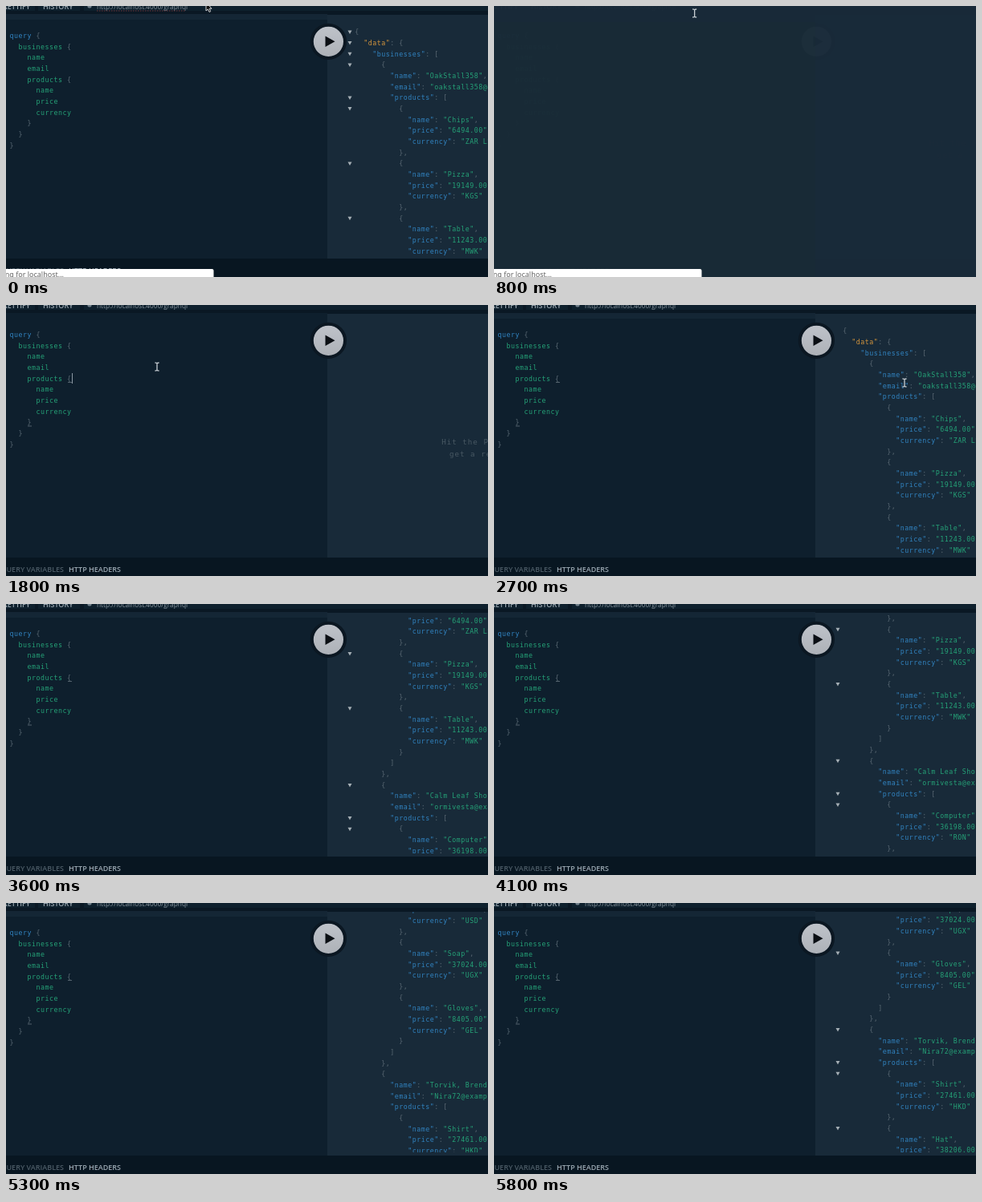
An HTML page that plays this animation: 600x338 px, repeating every 6000 ms.

```html
<!DOCTYPE html>
<html lang="en">
<head>
<meta charset="utf-8">
<title>Query playground</title>
<style>
  html, body { margin: 0; height: 100%; overflow: hidden; background: #192a39; }
  svg { display: block; width: 100vw; height: 100vh; }
  .code { font: 8.3px "DejaVu Sans Mono", monospace; letter-spacing: .503px; fill: #586772; }
  .hint { font-size: 9.2px; letter-spacing: 1px; fill: #485863; }
  .ui { font: 600 9px "Open Sans", sans-serif; fill: #9ca9b3; }
  .url { font-size: 8.3px; font-weight: 400; fill: #84919b; }
  .dim { fill: #4d5c67; }
  .key { fill: #3183c0; }
  .str { fill: #25a177; }
  .root { fill: #d4943c; }
</style>
</head>
<body>
<svg viewBox="0 0 600 338">
  <defs>
    <clipPath id="pane"><rect x="400" y="11" width="200" height="300"/></clipPath>
    <linearGradient id="metal" x2="0" y2="1">
      <stop stop-color="#bfc3ca"/><stop offset="1" stop-color="#adb1b7"/>
    </linearGradient>
  </defs>
  <rect width="600" height="338" fill="#192a39"/>
  <rect y="20" width="400" height="318" fill="#192b37"/>

  <g id="app">
    <rect width="600" height="338" fill="#0a1824"/>
    <rect y="10" width="400" height="305" fill="#0e1f2d"/>
    <rect id="strip" y="10" width="400" height="7" fill="#142635"/>
    <rect x="400" y="11" width="200" height="304" fill="#182a39"/>
    <rect y="315" width="600" height="23" fill="#081621"/>
    <path d="M0 0H36V6H0ZM40 0H92V6H40ZM97 0H600V6H97Z" fill="#0e202d"/>
    <g class="ui">
      <text x="30" y="3.5" text-anchor="end">PRETTIFY</text>
      <text x="46" y="3.5">HISTORY</text>
      <circle cx="104" cy="0" r="2.6" fill="#71808b"/>
      <text x="113" y="3.5" class="url">http://localhost:4000/graphql</text>
      <text x="72" y="333.3" text-anchor="end" class="dim">QUERY VARIABLES</text>
      <text x="78" y="333.3">HTTP HEADERS</text>
    </g>
    <path id="spelling" d="M113 6H223" stroke="#9b3e40" stroke-dasharray="1.5 1.5" opacity=".7"/>
    <g id="query" class="code"></g>
    <path id="braces" d="M77 96.5H82M27 151H32" stroke="#53616c"/>
    <path id="caret" d="M82.5 85V98" stroke="#8b98a3"/>
    <g id="hint" class="code hint" text-anchor="middle">
      <text x="614" y="173.5">Hit the Play Button to</text>
      <text x="614" y="188.5">get a response here</text>
    </g>
    <g clip-path="url(#pane)"><g id="result" class="code"></g></g>
    <circle cx="401.4" cy="44.3" r="20.6" fill="url(#metal)" stroke="#0b1722" stroke-width="4"/>
    <path d="M397.500 37.500L409.500 44.300L397.500 51Z" fill="#0b0f14"/>
  </g>

  <g id="status">
    <path d="M0 328H256.500Q258.500 328 258.500 330V338H0Z" fill="#fff"/>
    <text x="72" y="338" text-anchor="end" font-size="9" font-family="Noto Sans, sans-serif" fill="#666">Waiting for localhost...</text>
  </g>
  <g id="cursor">
    <path id="beam" d="M-2.500 -5Q0 -5 0 -4Q0 -5 2.500 -5M0 -4V4M-2.500 5Q0 5 0 4Q0 5 2.500 5" fill="none" stroke="#c9d0d5" stroke-width="1.3"/>
    <path id="arrow" d="M-1 -7V4L1.300 2L3 5.500L4.700 4.700L3.200 1.300H6Z" fill="#111" stroke="#e4e7ea" stroke-width=".9"/>
  </g>
</svg>
<script>
const $ = id => document.getElementById(id);
const show = (id, on) => $(id).style.display = on ? '' : 'none';
const span = (cls, text) => `<tspan class="${cls}">${text}</tspan>`;
const LINE = 13.667, INDENT = 11;

$('query').innerHTML = [
  [0, 'query {'], [1, 'businesses {'], [2, 'name'], [2, 'email'], [2, 'products {'],
  [3, 'name'], [3, 'price'], [3, 'currency'], [2, '}'], [1, '}'], [0, '}']
].map(([depth, text], i) => {
  const marked = text.replace(/\w+/, w => span(w === 'query' ? 'key' : 'str', w));
  return `<text x="${4.5 + depth * INDENT}" y="${40 + i * LINE}">${marked}</text>`;
}).join('');

const shops = [
  ['OakStall358', 'oakstall358@example.com',
    'Chips 6494 ZAR LSL,Pizza 19149 KGS,Table 11243 MWK'],
  ['Calm Leaf Shop', 'ormivesta@example.com',
    'Computer 36198 RON,Pants 7842 ZAR,Sausages 945 USD,Soap 37024 UGX,Gloves 8405 GEL'],
  ['Torvik, Brend and Osk', 'Nira72@example.com', 'Shirt 27461 HKD,Hat 38206 EUR']
];
const data = { data: { businesses: shops.map(([name, email, list]) => ({
  name, email,
  products: list.split(',').map(item => {
    const [name, price, ...currency] = item.split(' ');
    return { name, price: price + '.00', currency: currency.join(' ') };
  })
})) } };

// Each opening bracket also gets a fold marker in the gutter.
$('result').innerHTML = JSON.stringify(data, null, 2).split('\n').map((line, i) => {
  const depth = line.search(/\S/) / 2, y = 35.2 + i * LINE;
  const marked = line.trim().replace(/"[^"]*"(:?)/g, (match, colon) => {
    const word = colon ? match.slice(0, -1) : match;
    return span(word === '"data"' ? 'root' : colon ? 'key' : 'str', word) + colon;
  });
  const fold = /[{[]$/.test(line)
    ? `<path class="fold" data-y="${y}" d="M425.500 ${y - 4.800}h5l-2.500 4.500z" fill="#a5afb5"/>` : '';
  return `<text x="${434.3 + depth * INDENT}" y="${y}">${marked}</text>${fold}`;
}).join('');
const folds = [...document.querySelectorAll('.fold')];

const clamp = p => Math.max(0, Math.min(1, p));
const easeOut = (t, from, to, power) => 1 - (1 - clamp((t - from) / (to - from))) ** power;

// Time, x, y
const path = [
  [0, 250, 2], [300, 250, 4], [600, 250, 9], [1200, 249, 9], [1500, 203, 88], [1600, 188, 77],
  [1800, 188, 77], [2300, 409, 44], [2500, 409, 44], [2700, 511, 97], [3000, 615, 130], [6000, 615, 130]
];
function cursorAt(t) {
  const i = path.findIndex(p => p[0] > t);
  const a = path[i - 1], b = path[i], p = (t - a[0]) / (b[0] - a[0]);
  return [1, 2].map(k => a[k] + (b[k] - a[k]) * p);
}

function appOpacity(t) {
  if (t < 300) return 1;
  if (t < 800) return Math.max(.02, .12 - (t - 300) / 3000);
  return .02 + .98 * clamp((t - 800) / 500);
}

function foldLimit(t) {
  if (t < 300 || t >= 5400) return Infinity;
  return t < 3000 ? 0 : t < 4100 ? 452 : 617;
}

function draw(t) {
  const loaded = t < 800 || t >= 2500;
  const scroll = 164.7 * easeOut(t, 3200, 3900, 2) + 461.3 * easeOut(t, 4400, 5800, 2.060);
  const limit = foldLimit(t);
  const [x, y] = cursorAt(t);
  const arrow = t < 300 || (t >= 2200 && t < 2600);

  $('app').style.opacity = appOpacity(t);
  $('result').setAttribute('transform', `translate(0 ${-scroll})`);
  folds.forEach(f => f.style.display = f.dataset.y < limit ? '' : 'none');
  $('cursor').setAttribute('transform', `translate(${x} ${y})`);
  show('result', loaded);
  show('strip', loaded);
  show('hint', !loaded);
  show('status', t < 1000);
  show('spelling', t < 300);
  show('braces', t >= 1500);
  show('caret', t >= 1500 && t < 1900);
  show('arrow', arrow);
  show('beam', !arrow);
}

const start = performance.now();
function tick() {
  const t = (performance.now() - start) % 6000;
  draw(Math.floor(t / 100) * 100);
  requestAnimationFrame(tick);
}
tick();
</script>
</body>
</html>
```
